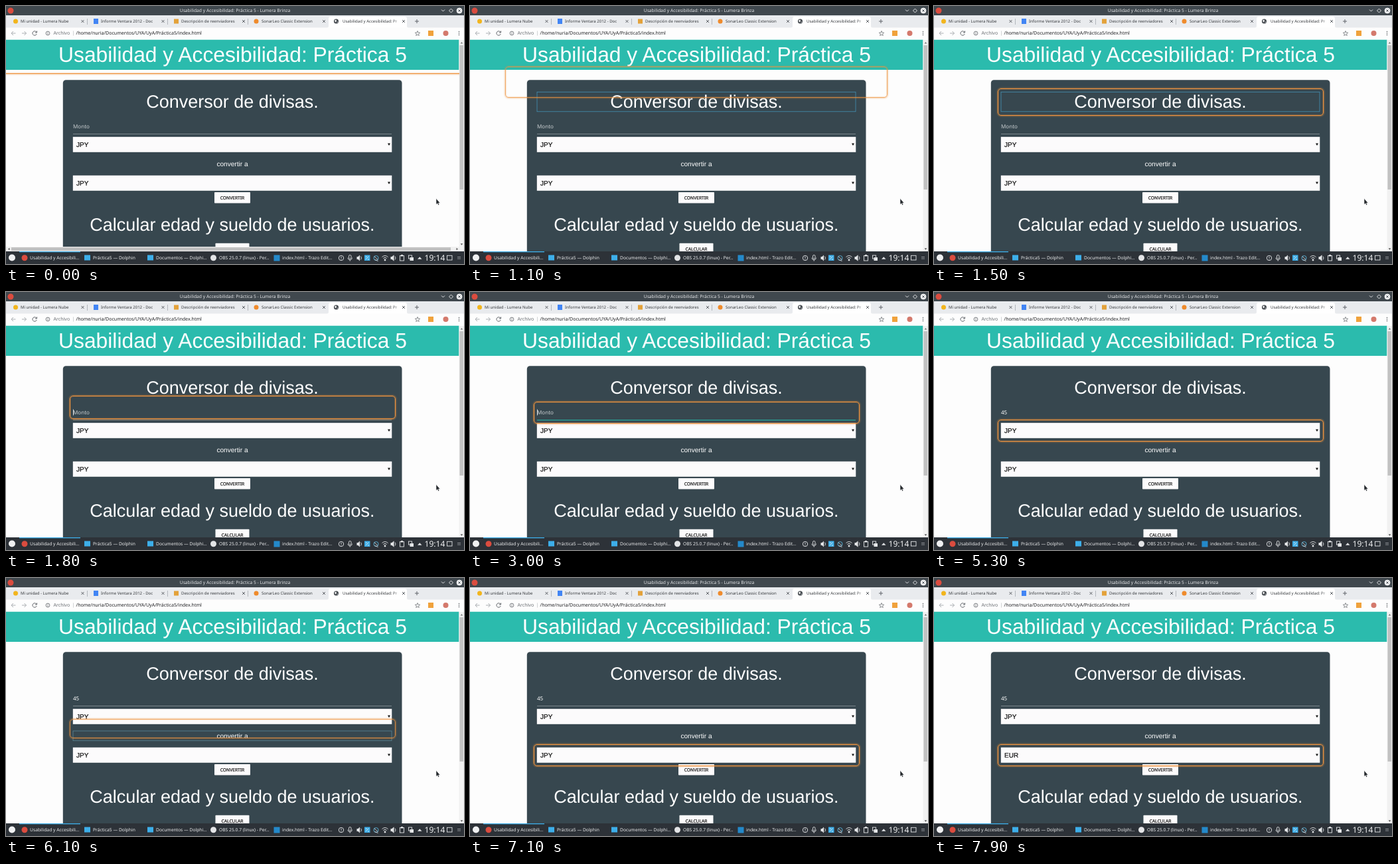
An HTML page that plays this animation: 690 px wide and 388 px high, repeating every 8000 ms.

```html
<!DOCTYPE html>
<html lang="es">
<head>
<meta charset="utf-8">
<title>Conversor de divisas</title>
<style>
html, body { margin: 0; width: 690px; height: 388px; overflow: hidden; background: #fdfdfd; }
svg { position: absolute; left: 0; top: 0; display: block; }
text { font-family: "Noto Sans", sans-serif; text-rendering: geometricPrecision; }
.page text { font-family: "Liberation Sans", Arial, sans-serif; }
.page .ui { font-family: "Noto Sans", sans-serif; }
.mid { text-anchor: middle; }
.dark { fill: #111; stroke: #111; stroke-width: .2; }
.tabs text { font-size: 6.06px; fill: #36393d; }
.tasks text { font-size: 6.73px; fill: #eff0f1; }
.line { fill: none; stroke: #5f6368; stroke-width: 1; }
.tray { fill: none; stroke: #e3e5e7; stroke-width: .9; }
.tray .solid { fill: #e3e5e7; stroke: none; }

.view { position: absolute; left: 0; top: 51px; width: 683px; height: 318px; overflow: hidden; }
.ring {
  position: absolute; box-sizing: border-box; border: 1.5px solid #ee9440; border-radius: 5px;
  box-shadow: 0 0 2px 1px rgba(236, 145, 60, .5), inset 0 0 2px rgba(236, 145, 60, .6);
  animation: ring 8s step-end infinite;
}
/* offsets are measured from the top of the viewport; the ring dims while it travels */
@keyframes ring {
  0%     { left: -5px;  top: -6px;    width: 693px; height: 56.5px; opacity: 1; }
  13.75% { left: 53px;  top: 40px;    width: 576px; height: 46.5px; opacity: .8; }
  15%    { left: 95.5px;  top: 73px;  width: 491px; height: 41px;   opacity: 1; }
  21.25% { left: 95.5px;  top: 84px;  width: 491px; height: 39px;   opacity: .8; }
  22.5%  { left: 95.5px;  top: 105px; width: 491px; height: 35px;   opacity: 1; }
  23.75% { left: 95.5px;  top: 114px; width: 491px; height: 33px;   opacity: 1; }
  46.25% { left: 95.5px;  top: 127px; width: 491px; height: 33px;   opacity: .8; }
  47.5%  { left: 95.5px;  top: 141px; width: 491px; height: 33px;   opacity: 1; }
  76.25% { left: 95.5px;  top: 161px; width: 491px; height: 29px;   opacity: .8; }
  77.5%  { left: 95.5px;  top: 174px; width: 491px; height: 25px;   opacity: 1; }
  83.75% { left: 95.5px;  top: 186px; width: 491px; height: 29px;   opacity: .8; }
  85%, 100% { left: 95.5px; top: 199px; width: 491px; height: 33px; opacity: 1; }
}

.hbar, .vbar, .head, .label, .caret, .hint, .four, .five, .jpy, .eur { animation: 8s step-end infinite; }
.hbar  { animation-name: hbar; }
.vbar  { animation-name: vbar; }
.head  { animation-name: head; }
.label { animation-name: label; }
.caret { animation-name: caret; }
.hint  { animation-name: hint; }
.four  { animation-name: four; }
.five  { animation-name: five; }
.jpy   { animation-name: jpy; }
.eur   { animation-name: eur; }
.under { animation: under 8s linear infinite; }
@keyframes hbar  { 0% { opacity: 1 } 12.5%, 100% { opacity: 0 } }
@keyframes vbar  { 0% { transform: translateY(-7px) } 12.5%, 100% { transform: none } }
@keyframes head  { 0% { opacity: 0 } 12.5% { opacity: 1 } 21.25%, 100% { opacity: 0 } }
@keyframes label { 0% { opacity: 0 } 75% { opacity: 1 } 83.75%, 100% { opacity: 0 } }
@keyframes caret {
  0% { opacity: 0 } 21.25% { opacity: 1 } 27.5% { opacity: 0 } 33.75% { opacity: 1 }
  41.25% { opacity: 1; transform: translateX(4.6px) }
  43.75% { opacity: 1; transform: translateX(9.2px) }
  46.25%, 100% { opacity: 0 }
}
@keyframes hint  { 0% { opacity: 1 } 41.25%, 100% { opacity: 0 } }
@keyframes four  { 0% { opacity: 0 } 41.25%, 100% { opacity: 1 } }
@keyframes five  { 0% { opacity: 0 } 43.75%, 100% { opacity: 1 } }
@keyframes jpy   { 0% { opacity: 1 } 92.5%, 100% { opacity: 0 } }
@keyframes eur   { 0% { opacity: 0 } 92.5%, 100% { opacity: 1 } }
@keyframes under { 0%, 22.5% { opacity: 0 } 25%, 46.25% { opacity: 1 } 48.75%, 100% { opacity: 0 } }
</style>
</head>
<body>

<svg class="page" width="690" height="388" viewBox="0 0 690 388">
  <rect width="690" height="388" fill="#fdfdfd"/>
  <rect y="50.5" width="682.5" height="45.5" fill="#2bbbad"/>
  <text class="mid" x="341.5" y="83.8" font-size="31.8" fill="#fff">Usabilidad y Accesibilidad: Práctica 5</text>

  <rect x="85.8" y="111.200" width="510.700" height="280" rx="4.500" fill="#37474f"/>
  <g fill="#fff" class="mid">
    <text x="341" y="153.300" font-size="27">Conversor de divisas.</text>
    <text x="341" y="240.700" font-size="10.1">convertir a</text>
    <text x="341" y="338" font-size="27">Calcular edad y sueldo de usuarios.</text>
  </g>
  <rect class="head" x="101" y="129.300" width="480" height="29.500" fill="none" stroke="#4391b5" stroke-width=".8"/>
  <rect class="label" x="101" y="230" width="480" height="14.700" fill="none" stroke="#5b8797" stroke-width=".8"/>

  <text class="ui hint" x="101" y="183.500" font-size="8.08" fill="#c9ced1">Monto</text>
  <g font-size="8.08" fill="#fff">
    <text class="ui four" x="101" y="183.500">4</text>
    <text class="ui five" x="105.600" y="183.500">5</text>
  </g>
  <rect class="caret" x="101" y="176.500" width=".8" height="9" fill="#fff"/>
  <path d="M101 192.500H581" stroke="#8f999e" stroke-width=".8"/>
  <path class="under" d="M101 192.700H581" stroke="#26a69a" stroke-width="1.300"/>

  <g fill="#fcfbfc">
    <rect x="100.800" y="196.800" width="480.500" height="23"/>
    <rect x="100.800" y="254.800" width="480.500" height="23"/>
    <rect x="314" y="280" width="54" height="16.500" rx=".8"/>
    <rect x="315.500" y="356.800" width="51" height="16.500" rx=".8"/>
  </g>
  <g font-size="10" class="dark">
    <text x="106" y="212">JPY</text>
    <text class="jpy" x="106" y="270">JPY</text>
    <text class="eur" x="106" y="270">EUR</text>
  </g>
  <path d="M575 206.500h4l-2 3.500zM575 264.500h4l-2 3.500z" fill="#111"/>
  <g font-size="6.73" class="mid dark">
    <text class="ui" x="341" y="290.800">CONVERTIR</text>
    <text class="ui" x="341" y="367.500">CALCULAR</text>
  </g>

  <rect x="682.500" y="51" width="7.500" height="318" fill="#f1f1f1"/>
  <rect x="683.500" y="59" width="5.500" height="217" fill="#c1c1c1"/>
  <path d="M684.700 56.500h3.600l-1.800-2.500z" fill="#777"/>
  <path class="vbar" d="M684.700 364.200h3.600l-1.800 2.500z" fill="#555"/>
  <g class="hbar">
    <rect y="362" width="690" height="7" fill="#f1f1f1"/>
    <rect x="8" y="363" width="662" height="5" fill="#c1c1c1"/>
    <path d="M5.500 363.700v3.600l-2.500-1.800zM678.500 363.700v3.600l2.500-1.800z" fill="#555"/>
  </g>
</svg>

<div class="view"><div class="ring"></div></div>

<svg width="690" height="388" viewBox="0 0 690 388">
  <defs>
    <linearGradient id="fade">
      <stop offset="0" stop-color="#e9ebee" stop-opacity="0"/><stop offset="1" stop-color="#e9ebee"/>
    </linearGradient>
    <linearGradient id="fadeOn">
      <stop offset="0" stop-color="#fff" stop-opacity="0"/><stop offset="1" stop-color="#fff"/>
    </linearGradient>
    <path id="close" d="M-2-2L2 2M2-2L-2 2"/>
  </defs>

  <!-- window title -->
  <rect width="690" height="14" fill="#40484e"/>
  <circle cx="7" cy="7" r="4.500" fill="#db4c3f"/>
  <text class="mid" x="345" y="9.300" font-size="6.73" fill="#e6e8ea">Usabilidad y Accesibilidad: Práctica 5 - Lumera Brinza</text>
  <g fill="none" stroke="#eff0f1" stroke-width=".9">
    <path d="M656 5.500l2.500 2.500 2.500-2.500M670.500 4l3 3-3 3-3-3z"/>
    <circle cx="683" cy="7" r="4" fill="#eff0f1"/>
    <path d="M681.500 5.500l3 3m0-3l-3 3" stroke="#40484e"/>
  </g>

  <!-- tabs -->
  <g class="tabs">
    <rect y="14" width="690" height="19" fill="#e9ebee"/>
    <path d="M483 33q3 0 3-3V19q0-3 3-3H601q3 0 3 3V30q0 3 3 3z" fill="#fff"/>
    <path d="M122.500 19v9M243.500 19v9M364.500 19v9" stroke="#9da1a6" stroke-width=".7"/>
    <circle cx="14.500" cy="23" r="3.500" fill="#f2b51d"/>
    <rect x="132" y="19" width="7" height="8" fill="#4285f4"/>
    <rect x="253" y="19.500" width="7" height="7" fill="#e3a23a"/>
    <circle cx="377" cy="23" r="3.500" fill="#ef8b2c"/>
    <circle cx="497.500" cy="23" r="3.600" fill="#4b5055"/>
    <path d="M495 22l2-1.500 1 2-1.500 2zM498.500 24.500l1.500-1 .3 1.300z" fill="#fff"/>
    <text x="22" y="25.300">Mi unidad - Lumera Nube</text>
    <text x="143" y="25.300">Informe Ventara 2012 - Doc</text>
    <text x="264" y="25.300">Descripción de reenviadores</text>
    <text x="385" y="25.300">SonarLeo Classic Extension</text>
    <text x="507" y="25.300">Usabilidad y Accesibilidad: Pr</text>
    <g fill="url(#fade)">
      <rect x="224" y="18" width="10" height="11"/>
      <rect x="345" y="18" width="10" height="11"/>
      <rect x="466" y="18" width="10" height="11"/>
    </g>
    <rect x="583" y="18" width="12" height="11" fill="url(#fadeOn)"/>
    <g class="line">
      <use href="#close" x="115.500" y="23"/><use href="#close" x="236.500" y="23"/>
      <use href="#close" x="358" y="23"/><use href="#close" x="479" y="23"/>
      <use href="#close" x="599" y="23"/>
      <path d="M616 23h6M619 20v6"/>
    </g>
  </g>

  <!-- toolbar -->
  <rect y="32.500" width="690" height="18" fill="#fdfdfd"/>
  <g class="line">
    <path d="M14.500 41H8M11 38l-3 3 3 3M24 41h6.500M27.500 38l3 3-3 3" stroke="#a9adb1"/>
    <path d="M46 39.500a3.200 3.200 0 1 0 .2 2.500M46.500 37.500v2.500h-2.500"/>
    <circle cx="63" cy="41" r="2.900" stroke-width=".8"/>
    <path d="M63 40.500v2.200M63 39v.8" stroke-width=".8"/>
    <path d="M101.500 37.500v7" stroke="#b5b8bb" stroke-width=".6"/>
    <path d="M620 37.500l1 2.500 2.700.2-2.100 1.700.7 2.600-2.300-1.400-2.300 1.400.7-2.600-2.100-1.700 2.700-.2z" stroke-width=".7"/>
  </g>
  <text x="71.500" y="43.300" font-size="7.07" fill="#6a6e73">Archivo</text>
  <text x="105.500" y="43.300" font-size="7.07" fill="#202124">/home/nuria/Documentos/UYA/UyA/Práctica5/index.html</text>
  <rect x="636" y="37" width="8" height="8" fill="#f0a23c"/>
  <circle cx="662.500" cy="41" r="4" fill="#d4796c"/>
  <g fill="#5f6368"><circle cx="682.500" cy="38.500" r=".8"/><circle cx="682.500" cy="41" r=".8"/><circle cx="682.500" cy="43.500" r=".8"/></g>

  <!-- task bar -->
  <rect y="369" width="690" height="19" fill="#2d3238"/>
  <circle cx="9" cy="378.500" r="5" fill="#eff0f1"/>
  <g class="tasks">
    <rect x="20" y="369" width="92" height="1.300" fill="#3daee9"/>
    <circle cx="28" cy="378.700" r="4.500" fill="#db4c3f"/>
    <rect x="118" y="374.500" width="9" height="8" fill="#3daee9"/>
    <rect x="213" y="374.500" width="9" height="8" fill="#3daee9"/>
    <circle cx="312.500" cy="378.700" r="4.500" fill="#e3e4e6"/>
    <rect x="403.500" y="374.500" width="9" height="9" fill="#2489ca"/>
    <text x="36" y="381.200">Usabilidad y Accesibili…</text>
    <text x="131" y="381.200">Práctica5 — Dolphin</text>
    <text x="226" y="381.200">Documentos — Dolphi…</text>
    <text x="321" y="381.200">OBS 25.0.7 (linux) - Per…</text>
    <text x="416" y="381.200">index.html - Trazo Edit…</text>
  </g>
  <g class="tray">
    <circle cx="505" cy="379" r="3.700"/>
    <path d="M505 376.800v2.700M505 380.500v.9"/>
    <rect x="516.500" y="374.500" width="3.500" height="5.500" rx="1.700"/>
    <path d="M515 378.500q0 3.200 3.200 3.200t3.200-3.200M518.200 381.700v2"/>
    <path class="solid" d="M528.500 377h2l2.500-2.500v9l-2.500-2.500h-2z"/>
    <path d="M534.500 376.500q2 2.500 0 5"/>
    <rect x="540" y="374.500" width="8.500" height="8.500" fill="#3daee9" stroke="none"/>
    <path d="M542 381l4.500-4.500M542 377h2M545 381h2"/>
    <circle cx="557.500" cy="379" r="3.500" stroke="#58b5dc"/>
    <path d="M555.500 381.500l5 2M555 376.500l5 5"/>
    <path d="M566.500 377.500q4.500-4 9 0M568.300 379.500q2.700-2.400 5.400 0"/>
    <circle class="solid" cx="571" cy="382" r="1.400"/>
    <path class="solid" d="M579.500 377h2l3-2.700v9.400l-3-2.700h-2z"/>
    <path d="M586 376.500q2 2.500 0 5"/>
    <rect x="593.500" y="375.500" width="6" height="7.500"/>
    <path class="solid" d="M595 374h3v2.500h-3z"/>
    <rect x="606.500" y="375" width="5" height="5"/>
    <rect class="solid" x="608.500" y="378" width="5.500" height="5"/>
    <path class="solid" d="M620 380.700h6.500l-3.250-3.500z"/>
    <rect x="664.500" y="375.300" width="7.500" height="6.700"/>
    <path d="M680 377.500h5M680 380h5" stroke="#9da1a5"/>
  </g>
  <text class="mid" x="646" y="383" font-size="12.100" fill="#eff0f1">19:14</text>

  <path d="M648 289.500v9l2-1.700 1.200 2.700 1.500-.7-1.200-2.600h2.500z" fill="#25292d" stroke="#fff" stroke-width=".5"/>
</svg>
</body>
</html>
```
